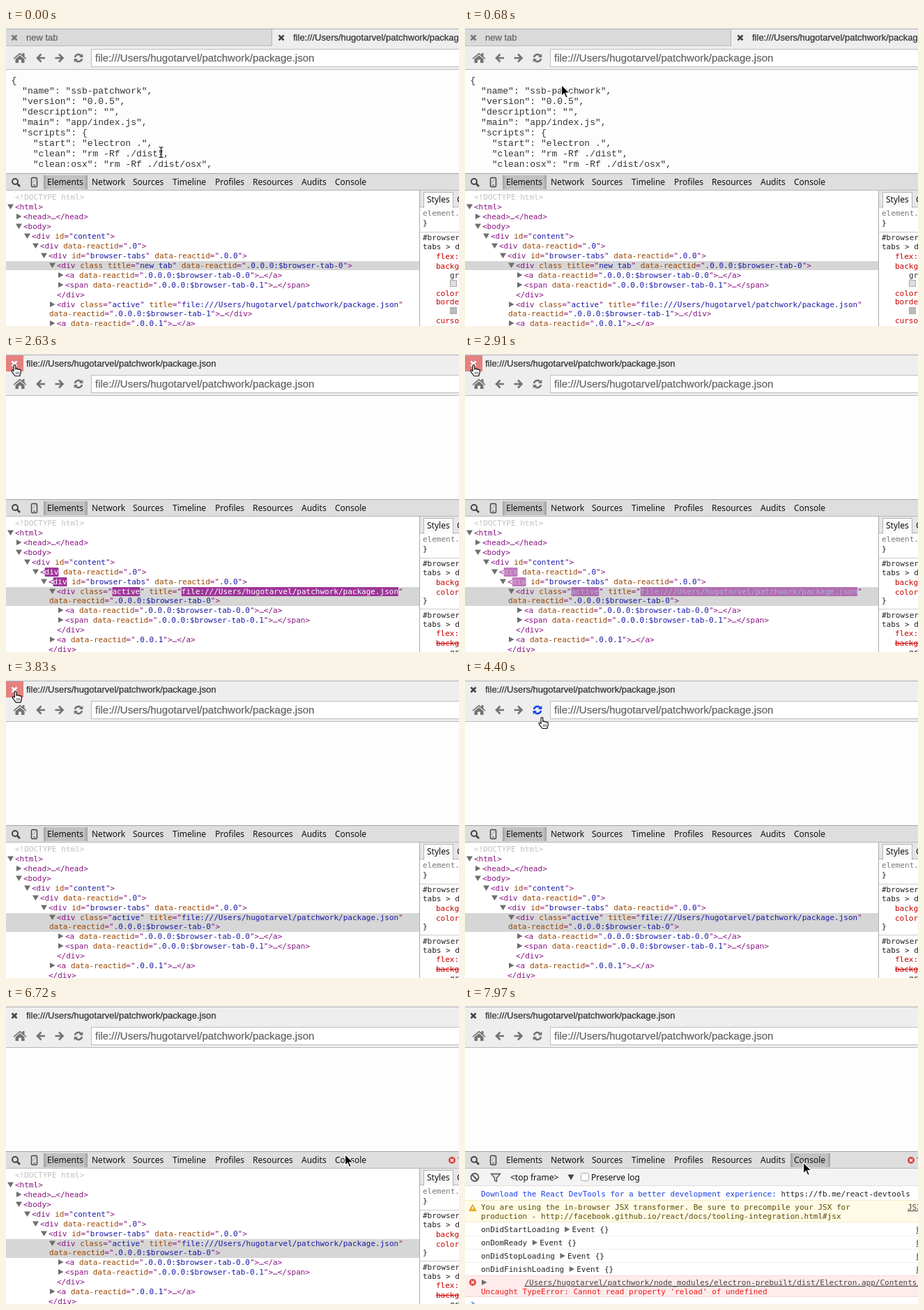
Animation of 650x427 px, one loop 8000 ms. Source, as an HTML page:

```html
<!DOCTYPE html>
<html lang="en">
<head>
<meta charset="utf-8">
<title>Closing a browser tab</title>
<style>
  html, body { margin: 0; width: 100%; height: 100%; overflow: hidden; background: #fff; }
  svg { display: block; width: 650px; height: 427px; }
  text { white-space: pre; }
  .sans { font-family: "Liberation Sans", Arial, sans-serif; stroke-width: .25px; }
  .ui { font: 12px "Noto Sans", "Open Sans", sans-serif; fill: #111; }
  .mono { font: 11px "DejaVu Sans Mono", monospace; fill: #222; }
  .json { font: 13px "Liberation Mono", monospace; fill: #333; }
  .tag { fill: #881280; }
  .attr { fill: #994500; }
  .val { fill: #1a1aa6; }
  .prop { fill: #c80000; }
  .link { text-decoration: underline; fill: #444; }
</style>
</head>
<body>
<svg id="stage" viewBox="0 0 650 427" xmlns="http://www.w3.org/2000/svg"></svg>
<script>
const LOOP = 8000;
const CLOSE = 2630, HIGHLIGHT = 800, ERROR = 5300, CONSOLE = 7020, CARET_OFF = 7560;
const FILE = 'file:///Users/hugotarvel/patchwork/package.json';
const ICON_X = { home: 20, back: 50, forward: 76.5, reload: 104 };

const esc = s => s.replace(/&/g, '&amp;').replace(/</g, '&lt;').replace(/>/g, '&gt;');
const rect = (x, y, w, h, fill, extra = '') =>
  `<rect x="${x}" y="${y}" width="${w}" height="${h}" fill="${fill}" ${extra}/>`;
const text = (cls, x, y, s, extra = '') =>
  `<text class="${cls}" x="${x}" y="${y}" ${extra}>${esc(s)}</text>`;
const label = (x, y, s, size, color) =>
  text('sans', x, y, s, `font-size="${size}" fill="${color}" stroke="${color}"`);
const path = (d, fill, extra = '') => `<path d="${d}" fill="${fill}" ${extra}/>`;
const line = (d, color, width) => path(d, 'none', `stroke="${color}" stroke-width="${width}"`);
const group = (id, body) => `<g id="${id}">${body}</g>`;
const down = (x, y) => path(`M${x} ${y - 3.5}h9l-4.5 7.5z`, '#6e6e6e');
const right = (x, y) => path(`M${x} ${y - 4}v8l7.5-4z`, '#6e6e6e');
const cross = (x, y, id, color) =>
  path(`M${x - 3.5} ${y - 3.5}l7 7m0-7l-7 7`, 'none', `id="${id}" stroke="${color}" stroke-width="2.6"`);
const errorBadge = (x, y) => `<circle cx="${x}" cy="${y}" r="5" fill="#dc4642"/>` +
  line(`M${x - 2} ${y - 2}l4 4m0-4l-4 4`, '#fff', 1.4);

// Browser chrome
function tabs() {
  const two = rect(0, 2, 381, 23, '#dadada') + rect(0, 25, 382, 1, '#b9b9b9') +
    rect(381, 2, 1, 24, '#b3b3b3') + label(29, 18, 'new tab', 13, '#666') +
    cross(395, 14, 'closeSecond', '#444') + label(412, 18, FILE, 13, '#333');
  return rect(0, 0, 650, 60, '#eee') + rect(0, 1, 650, 1, '#b5b5b5') +
    group('twoTabs', two) + group('oneTab', label(29, 18, FILE, 13, '#333')) +
    rect(0, 2, 25, 23, '#e58080', 'id="closeHot"') + cross(12, 14, 'closeFirst', '#777');
}

function toolbar() {
  const arrow = line('M6 0H-5M.5-5.5L-5 0l5.5 5.5', 'currentColor', 2.6);
  const shapes = {
    home: path('M-9.5 .5L0-7.5l3.5 3v-2.5h3v5L9.5 .5l-1 1.2L0-5.3l-8.5 7zM-6.5 1.5L0-3.8l6.5 5.3V7H2V2.5h-4V7h-4.5z', 'currentColor'),
    back: arrow,
    forward: `<g transform="scale(-1 1)">${arrow}</g>`,
    reload: line('M-5-1A5 5 0 0 1 4-3M5 1A5 5 0 0 1-4 3', 'currentColor', 2.6) +
      path('M6.3-6.3V-1H1zM-6.3 6.3V1H-1z', 'currentColor')
  };
  const icons = Object.keys(shapes).map(k =>
    `<g id="${k}" transform="translate(${ICON_X[k]} 43)">${shapes[k]}</g>`).join('');
  return icons + rect(122.5, 30.5, 540, 25, '#fff', 'stroke="#bdbdbd"') +
    label(128, 48, FILE, 15, '#666') + rect(0, 59, 650, 1, '#b8b8b8');
}

function json() {
  return ['{', '  "name": "ssb-patchwork",', '  "version": "0.0.5",', '  "description": "",',
    '  "main": "app/index.js",', '  "scripts": {', '    "start": "electron .",',
    '    "clean": "rm -Rf ./dist",', '    "clean:osx": "rm -Rf ./dist/osx",']
    .map((s, i) => text('json', 7.5, 79 + 15 * i, s)).join('');
}

// Developer tools
function toolTabs() {
  const names = { Elements: 59, Network: 123, Sources: 182, Timeline: 239, Profiles: 300,
    Resources: 354, Audits: 424, Console: 472 };
  const selected = (id, x, w) => rect(x, 211, w, 20, 'url(#pressed)', `id="${id}"`);
  return rect(0, 208, 650, 25, '#dedede') + rect(0, 208, 650, 1, '#a3a3a3') + rect(0, 232, 650, 1, '#b8b8b8') +
    '<circle cx="13" cy="220" r="4" fill="none" stroke="#444" stroke-width="2"/>' +
    line('M16 223l4 4', '#444', 2.6) +
    rect(36.5, 214.5, 8, 13, 'none', 'rx="1.5" stroke="#444" stroke-width="1.4"') +
    rect(39, 224.5, 3, 1, '#444') + line('M38 222l5-6', '#999', 1) +
    selected('elementsOn', 54, 63) + selected('consoleOn', 467, 57) +
    Object.entries(names).map(([s, x]) => text('ui', x, 225, s)).join('') +
    group('errorCount', errorBadge(640, 221) + text('ui', 647, 225, '1', 'style="fill:#c33"'));
}

function markup(s) {
  const token = /(<\/?\w+|>)|"([^"]*)"|([\w-]+)(?=[= ])/g;
  const span = (cls, v) => `<tspan class="${cls}">${esc(v)}</tspan>`;
  return s.replace(token, (m, tag, val, attr) =>
    tag ? span('tag', tag) : attr ? span('attr', attr) : '"' + span('val', val) + '"');
}

// Each row: x, vertical centre, marker, source
const tree = rows => rows.map(([x, y, mark, s]) =>
  (mark === 'v' ? down(x - 11, y) : mark === '>' ? right(x - 10, y) : '') +
  `<text class="mono tag" x="${x}" y="${y + 4}">${markup(s)}</text>`).join('');

const id = n => `data-reactid=".0.0.${n}"`;
const children = y => [
  [85, y, '>', `<a ${id('0:$browser-tab-0.0')}>…</a>`],
  [85, y + 14, '>', `<span ${id('0:$browser-tab-0.1')}>…</span>`],
  [73, y + 28, '', '</div>']
];

function elements() {
  const shared = tree([
    [13, 256, 'v', '<html>'], [25, 270, '>', '<head>…</head>'], [25, 284, 'v', '<body>'],
    [37, 298, 'v', '<div id="content">'], [49, 312, 'v', '<div data-reactid=".0">'],
    [61, 326, 'v', '<div id="browser-tabs" data-reactid=".0.0">']
  ]);
  const active = `<div class="active" title="${FILE}"`;
  const before = rect(0, 334, 593, 13, '#d6d6d6') + tree([
    [73, 340, 'v', `<div class title="new tab" ${id('0:$browser-tab-0')}>`], ...children(354),
    [73, 396, '>', active], [62, 409, '', `${id('0:$browser-tab-1')}>…</div>`],
    [73, 423, '>', `<a ${id('1')}>…</a>`]
  ]);
  const after = rect(0, 334, 593, 27, '#d6d6d6') + tree([
    [73, 340, 'v', active], [62, 353, '', `${id('0:$browser-tab-0')}>`], ...children(367),
    [73, 409, '>', `<a ${id('1')}>…</a>`], [61, 423, '', '</div>']
  ]);
  const flash = [[55.6, 312, 'div'], [67.6, 326, 'div'], [152.5, 340, 'active'], [251.8, 340, FILE]]
    .map(([x, y, s]) => rect(x, y - 6, s.length * 6.622, 13, '#9e3699', 'rx="1"') +
      text('mono', x, y + 4, s, 'style="fill:#fff"')).join('');
  return rect(0, 233, 650, 194, '#fff') + text('mono', 13, 246, '<!DOCTYPE html>', 'style="fill:#c0c0c0"') +
    group('treeBefore', before) + group('treeAfter', after) + shared + group('flash', flash) + styles();
}

function styles() {
  const head = y => text('mono', 598, y, '#browser-') + text('mono', 598, y + 13, 'tabs > div');
  const prop = (y, s, struck) => text('mono prop', 617, y, s, struck ? 'text-decoration="line-through"' : '');
  const swatch = (y, fill) => rect(637.5, y + .5, 9, 9, fill, 'stroke="#aaa"');
  const before = head(304) + prop(331, 'flex: 1;') + prop(345, 'background') + text('mono', 637, 358, 'gradient') +
    swatch(361, '#ddd') + prop(384, 'color: #') + prop(396, 'border-') + swatch(400, '#bbb') + prop(423, 'cursor:');
  const after = head(304) + prop(331, 'background') + prop(345, 'color: #') + text('mono', 598, 357, '}') +
    rect(594, 365, 56, 1, '#ccc') + head(378) + prop(404, 'flex: 1;') + prop(418, 'background', true) +
    text('mono', 637, 431, 'gradient');
  return rect(594, 233, 56, 194, '#fff') + rect(594, 233, 56, 23, '#e6e6e6') +
    rect(593, 233, 1, 194, '#aaa') + rect(594, 256, 56, 1, '#b5b5b5') +
    rect(599.5, 235.5, 42, 22, '#fafafa', 'stroke="#b5b5b5"') + rect(600, 256, 41, 3, '#fff') +
    text('ui', 604, 250, 'Styles') + text('ui', 647, 250, 'Computed') +
    text('mono', 598, 269, 'element.style', 'style="fill:#777"') + text('mono', 598, 283, '}') +
    rect(594, 292, 56, 1, '#ccc') + group('rulesBefore', before) + group('rulesAfter', after);
}

function consolePanel() {
  const events = ['onDidStartLoading', 'onDomReady', 'onDidStopLoading', 'onDidFinishLoading'].map((s, i) => {
    const y = 320 + 19 * i, end = 23 + s.length * 6.622;
    return text('mono', 23, y + 4, s) + right(end + 7.5, y) +
      text('mono', end + 18, y + 4, 'Event {}', 'font-style="italic"') +
      text('mono link', 647.5, y + 4, 'bundle.js') + rect(0, y + 9, 650, 1, '#efefef');
  }).join('');
  const note = (y, s, color) => text('mono', 23, y, s, `style="fill:${color}"`);
  const band = (y, h, fill, edge) => rect(0, y, 650, h, fill) + rect(0, y, 650, 1, edge) + rect(0, y + h - 1, 650, 1, edge);
  return rect(0, 233, 650, 194, '#fff') + rect(0, 233, 650, 24, '#f3f3f3') + rect(0, 257, 650, 1, '#ddd') +
    '<circle cx="14" cy="245.5" r="5.5" fill="none" stroke="#555" stroke-width="1.8"/>' +
    line('M10 241.5l8 8', '#555', 1.8) +
    path('M37.5 240.5h13l-5 6v5l-3-1.5v-3.5z', '#ddd', 'stroke="#555" stroke-width="1.3"') +
    text('ui', 65, 250, '<top frame>') + path('M147.5 241.5h9l-4.5 8z', '#444') +
    rect(166.5, 239.5, 11, 11, '#fff', 'rx="2" stroke="#aaa"') + text('ui', 181, 250, 'Preserve log') +
    note(273, 'Download the React DevTools for a better development experience:', '#1a3fe0') +
    text('mono', 453.4, 273, 'https://fb.me/react-devtools') + band(278, 32, '#fffbe6', '#f3ecc8') +
    path('M11 284.5l5 9h-10z', '#f0b429', 'stroke="#d99a1c" stroke-linejoin="round"') +
    rect(10.4, 287, 1.3, 4, '#fff') +
    note(292, 'You are using the in-browser JSX transformer. Be sure to precompile your JSX for', '#5c4a00') +
    note(305, 'production - http://facebook.github.io/react/docs/tooling-integration.html#jsx', '#5c4a00') +
    text('mono link', 635, 292, 'JSXTransformer.js') + events + band(386, 31, '#ffebeb', '#f8d6d6') +
    errorBadge(11, 396) + right(24, 396) +
    text('mono link', 85.5, 400, '/Users/hugotarvel/patchwork/node_modules/electron-prebuilt/dist/Electron.app/Contents/') +
    note(413, "Uncaught TypeError: Cannot read property 'reload' of undefined", '#f01818') +
    line('M9.5 424l4 3.5-4 3.5', '#3879d9', 1.6) + rect(23, 421, 1, 6, '#222', 'id="caret"');
}

function cursors() {
  const beam = 'M-3-7.5q3 0 3 2v11q0 2-3 2M3-7.5q-3 0-3 2v11q0 2 3 2M-2 3h4';
  const arrow = 'M0 0V16L3.7 12.5 6.3 18.5 8.9 17.4 6.3 11.6H11.5Z';
  const hand = 'M-1.5 9.5V1.5a1.4 1.4 0 0 1 2.8 0V6q1.3-1.3 2.6 .4 1.6-.9 2.5 .6 2.2-.6 2.3 1.4V11.5L7.2 16H.6L-3.6 10.6Q-5 8.5-3.8 7.8-2.6 7.4-1.5 9.5Z';
  return group('pointer',
    group('beam', line(beam, '#111', 1.2)) +
    group('arrow', path(arrow, '#000', 'stroke="#fff" stroke-width="1.2"')) +
    group('hand', path(hand, '#fff', 'stroke="#111" stroke-width="1.2"') +
      line('M2 10v3.5M4 10v3.5M6 10v3.5', '#333', .8)));
}

const stage = document.getElementById('stage');
stage.innerHTML = `<defs><linearGradient id="pressed">
  <stop offset="0" stop-color="#a0a0a0"/><stop offset=".08" stop-color="#c2c2c2"/>
  <stop offset=".92" stop-color="#c2c2c2"/><stop offset="1" stop-color="#a0a0a0"/></linearGradient></defs>` +
  rect(0, 0, 650, 427, '#fdfdfd') + tabs() + toolbar() + group('page', json()) + toolTabs() +
  group('elementsPanel', elements()) + group('consolePanel', consolePanel()) + cursors();

const el = {};
stage.querySelectorAll('[id]').forEach(n => { el[n.id] = n; });
const show = (name, on) => { el[name].style.display = on ? '' : 'none'; };

// Pointer moves: start, end, bend point, destination
const moves = [
  [20, 680, [310, 120], [138.5, 81.5]],
  [820, 1640, [40, 60], [12.5, 15.5]],
  [3790, 4400, [60, 36], [110.5, 53.5]],
  [5920, 6720, [300, 134], [486.5, 212.5]],
  [7969, 7970, [486, 218], [485.5, 224]]
];

function pointerAt(t) {
  let at = [222.5, 178];
  for (const [start, end, bend, to] of moves) {
    if (t <= start) break;
    const p = Math.min(1, (t - start) / (end - start));
    const k = p * p * (3 - 2 * p), m = 1 - k;
    at = at.map((v, i) => m * m * v + 2 * m * k * bend[i] + k * k * to[i]);
  }
  return at;
}

function render(t) {
  const [x, y] = pointerAt(t);
  const closed = t >= CLOSE, inConsole = t >= CONSOLE;
  const onClose = x < 25 && y < 25;
  let onIcon = false;
  for (const name in ICON_X) {
    const hot = Math.abs(x - ICON_X[name]) < 12 && Math.abs(y - 43) < 13;
    el[name].style.color = hot ? '#0d47f0' : '#737373';
    onIcon = onIcon || hot;
  }
  for (const name of ['twoTabs', 'page', 'treeBefore', 'rulesBefore']) show(name, !closed);
  for (const name of ['oneTab', 'treeAfter', 'rulesAfter']) show(name, closed);
  show('closeHot', onClose);
  el.closeFirst.setAttribute('stroke', onClose ? '#fff' : closed ? '#444' : '#777');
  el.flash.setAttribute('opacity', closed ? Math.max(0, 1 - (t - CLOSE) / HIGHLIGHT) : 0);

  show('errorCount', t >= ERROR);
  show('elementsPanel', !inConsole);
  show('elementsOn', !inConsole);
  show('consolePanel', inConsole);
  show('consoleOn', inConsole);
  show('caret', t < CARET_OFF);

  const kind = t < 110 ? 'beam' : onClose || onIcon ? 'hand' : 'arrow';
  for (const name of ['beam', 'arrow', 'hand']) show(name, name === kind);
  el.pointer.setAttribute('transform', `translate(${x.toFixed(2)} ${y.toFixed(2)})`);
}

const began = performance.now();
function frame() {
  render((performance.now() - began) % LOOP);
  requestAnimationFrame(frame);
}
render(0);
requestAnimationFrame(frame);
</script>
</body>
</html>
```
